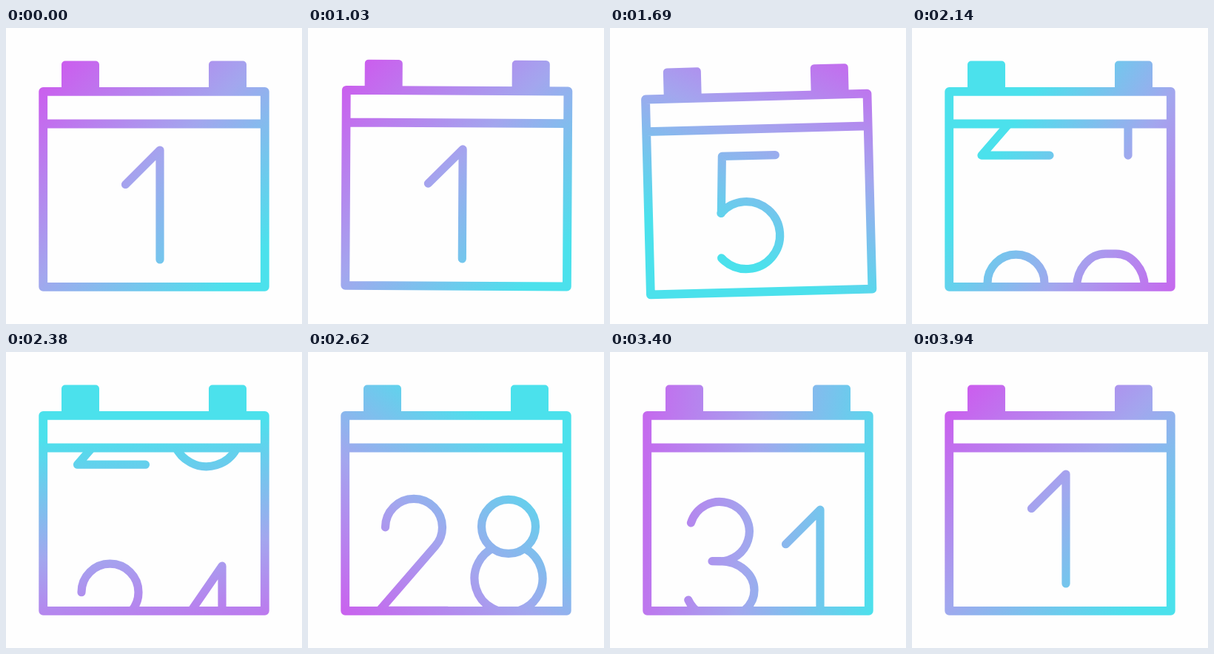
These frames come from a looping animation (400x400 px, 3.97 s). An HTML page with a canvas:

```html
<!DOCTYPE html>
<html>
<head>
<meta charset="utf-8">
<style>
html, body { margin: 0; width: 100%; height: 100%; overflow: hidden; background: #fefefe; }
canvas { display: block; width: 400px; height: 400px; }
</style>
</head>
<body>
<canvas id="stage"></canvas>
<script>
const LOOP = 3970;
const STEP = 285; // distance between numbers on the strip
const RAD = Math.PI / 180;
const canvas = document.getElementById('stage');
const ctx = canvas.getContext('2d');
const dpr = window.devicePixelRatio || 1;
canvas.width = canvas.height = 400 * dpr;

const span = (t, from, to) => Math.min(1, Math.max(0, (t - from) / (to - from)));
const ease = (t, from, to) => (1 - Math.cos(Math.PI * span(t, from, to))) / 2;

// Smooth rising curve through a few [time, value] points
function track(pts) {
  const n = pts.length - 1;
  const slope = i => (pts[i + 1][1] - pts[i][1]) / (pts[i + 1][0] - pts[i][0]);
  const tangent = i => {
    if (i === 0 || i === n) return 0;
    const a = slope(i - 1), b = slope(i);
    return 2 * a * b / (a + b);
  };
  return t => {
    if (t <= pts[0][0]) return pts[0][1];
    if (t >= pts[n][0]) return pts[n][1];
    let i = 0;
    while (t > pts[i + 1][0]) i++;
    const [t0, a] = pts[i], [t1, b] = pts[i + 1];
    const h = t1 - t0, u = (t - t0) / h, v = 1 - u;
    return a * v * v * (1 + 2 * u) + b * u * u * (3 - 2 * u)
      + h * u * v * (tangent(i) * v - tangent(i + 1) * u);
  };
}

const roll = track([[1450, 0], [1690, 0.996], [2140, 4.501], [2620, 6.125], [2950, 6.877], [3190, 7]]);

// Lean right, snap past upright, settle
function tilt(t) {
  const rise = Math.sin(Math.PI / 2 * span(t, 1000, 1520)) ** 1.35;
  return 8 * rise - 9.75 * ease(t, 1525, 1710) + 1.75 * ease(t, 1710, 2090);
}

function line(...p) {
  ctx.moveTo(p[0], p[1]);
  for (let i = 2; i < p.length; i += 2) ctx.lineTo(p[i], p[i + 1]);
}

const arc = (x, y, r, from, to) => ctx.arc(x, y, r, from * RAD, to * RAD);

const digits = {
  0() { ctx.roundRect(-46, 161, 92, 154, { x: 39, y: 46 }); },
  1() { line(-46.5, 211.5, 0, 165, 0, 313); },
  2() {
    arc(0, 200.5, 38.5, 180, 401);
    ctx.lineTo(-46.5, 313);
    ctx.lineTo(45.5, 313);
  },
  3() {
    arc(-1, 194.5, 40.3, 197, 450);
    ctx.lineTo(-11, 234.5);
    ctx.lineTo(0, 234.5);
    ctx.ellipse(0, 273.5, 46, 39, 0, -90 * RAD, 160 * RAD);
  },
  4() { line(27, 268, -71, 268, 0, 165, 0, 313); },
  5() {
    line(42, 165, -30, 165, -33, 242);
    arc(0, 272.5, 45.5, 222.5, 499);
  },
  8() {
    arc(0, 199.5, 36.5, 0, 360);
    ctx.moveTo(46 * Math.cos(62 * RAD), 269.5 - 46 * Math.sin(62 * RAD));
    arc(0, 269.5, 46, -62, 242);
  }
};

// Numbers as digit and x pairs
const strip = [
  [[1, 208]],
  [[5, 181.5]],
  [[1, 142], [0, 256]],
  [[1, 150], [5, 245]],
  [[2, 140.5], [0, 268.5]],
  [[2, 140.5], [4, 292]],
  [[2, 143], [8, 271]],
  [[3, 149], [1, 284]],
  [[1, 208]]
];

function drawDigits(pos) {
  ctx.save();
  ctx.beginPath();
  ctx.rect(50, 129, 300, 221);
  ctx.clip();
  ctx.lineWidth = 11.2;
  strip.forEach((number, i) => {
    const y = (pos - i) * STEP;
    if (Math.abs(y) > 240) return;
    for (const [d, x] of number) {
      // Path is moved, paint stays put
      ctx.save();
      ctx.translate(x, y);
      ctx.beginPath();
      digits[d]();
      ctx.restore();
      ctx.stroke();
    }
  });
  ctx.restore();
}

// Turning gradient that slides toward its purple end midway
function makePaint(t) {
  const turn = 315 * ease(t, 1010, 3190) + 45 * ease(t, 3200, 3950);
  const a = (turn - 45) * RAD;
  const bump = Math.sin(Math.PI * span(t, 1010, 3190));
  const shift = 10 + 62 * bump, half = 185 - 22 * bump;
  const at = d => [200 + Math.sin(a) * d, 200 - Math.cos(a) * d];
  const g = ctx.createLinearGradient(...at(shift + half), ...at(shift - half));
  g.addColorStop(0, '#cb5eee');
  g.addColorStop(0.5, '#a3a6ee');
  g.addColorStop(1, '#4be1ec');
  return g;
}

function draw(t) {
  ctx.setTransform(dpr, 0, 0, dpr, 0, 0);
  ctx.fillStyle = '#fefefe';
  ctx.fillRect(0, 0, 400, 400);
  const lean = tilt(t);
  const [kx, ky] = lean > 0 ? [2.6, -3.5] : [-0.8, -4.5];
  ctx.translate(200 + lean * kx, 217.5 + lean * ky);
  ctx.rotate(lean * RAD);
  ctx.translate(-200, -217.5);
  ctx.fillStyle = ctx.strokeStyle = makePaint(t);
  ctx.lineCap = ctx.lineJoin = 'round';

  drawDigits(roll(t) + ease(t, 3200, 3945));

  ctx.lineWidth = 11.8;
  ctx.beginPath();
  ctx.rect(50.2, 85.8, 299.6, 264);
  line(50.2, 129.5, 349.8, 129.5);
  ctx.stroke();
  ctx.beginPath();
  for (const x of [75, 274]) ctx.roundRect(x, 44.5, 51, 42, [5, 5, 0, 0]);
  ctx.fill();
}

const start = performance.now();
function tick() {
  draw((performance.now() - start) % LOOP);
  requestAnimationFrame(tick);
}
tick();
</script>
</body>
</html>
```
